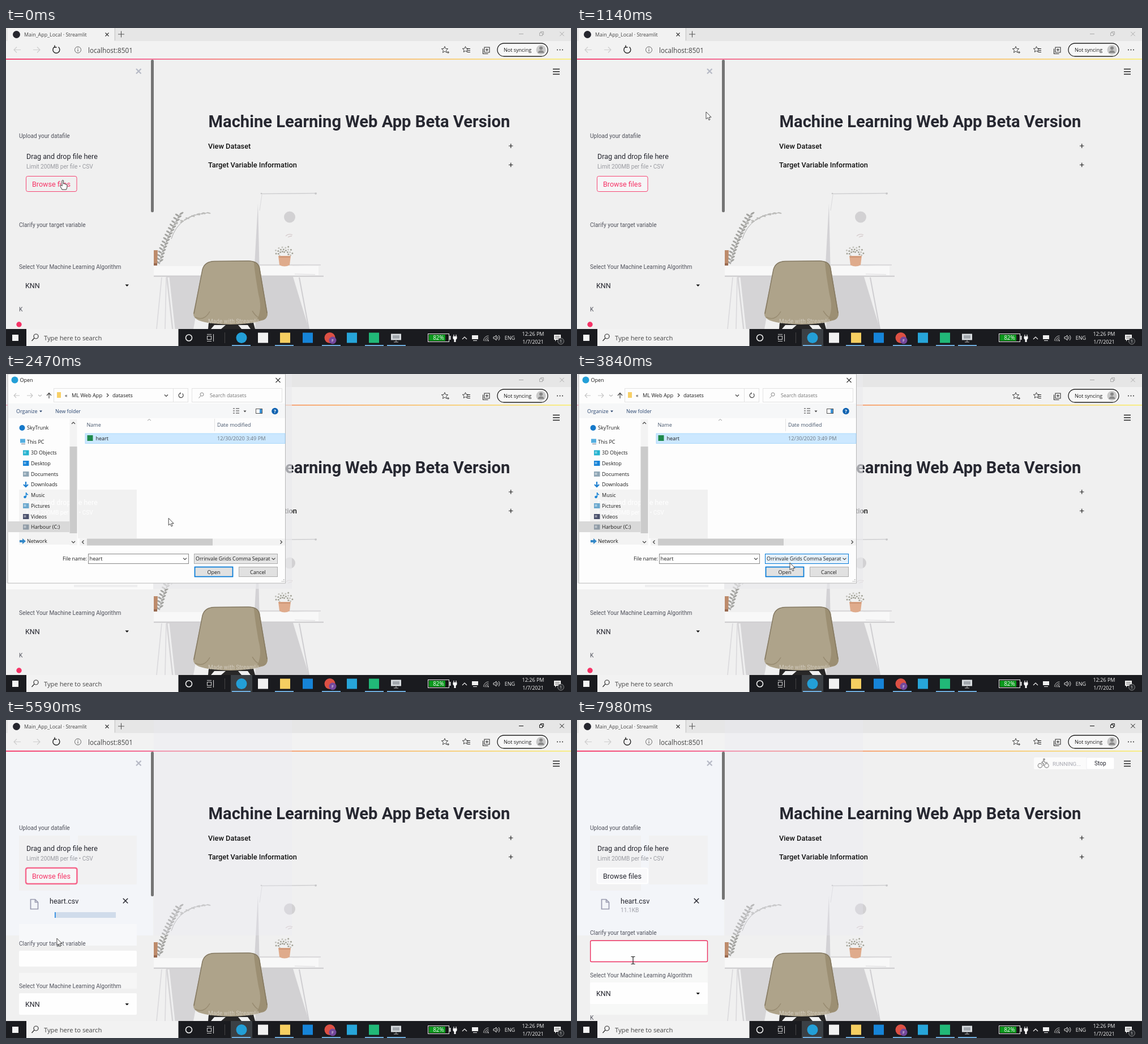
Recreate the animation shown at these times as an HTML page. Size 998 px wide and 561 px high, loop 8 s.

```html
<!DOCTYPE html>
<html lang="en">
<head>
<meta charset="utf-8">
<title>Uploading a data file</title>
<style>
html, body { margin: 0; width: 100%; height: 100%; overflow: hidden; background: #f0f0f0; }
svg { display: block; width: 998px; height: 561px; }
text { font-family: "Open Sans", "Noto Sans", sans-serif; fill: #1c1c1c; white-space: pre; }
text.w { font-family: Roboto, "Open Sans", sans-serif; fill: #262730; }
</style>
</head>
<body>
<svg id="stage" viewBox="0 0 998 561" xmlns="http://www.w3.org/2000/svg"></svg>
<script>
const LOOP = 8000;

// Markup helpers; text is placed by the middle of its capitals.
const attrs = o => Object.entries(o).map(([k, v]) => ` ${k}="${v}"`).join('');
const rect = (x, y, w, h, fill, o = {}) => `<rect${attrs({ x, y, width: w, height: h, fill, ...o })}/>`;
const disc = (cx, cy, r, fill, o = {}) => `<circle${attrs({ cx, cy, r, fill, ...o })}/>`;
const shape = (d, fill, o = {}) => `<path${attrs({ d, fill, ...o })}/>`;
const line = (d, stroke = '#222', width = 1, o = {}) => shape(d, 'none', { stroke, 'stroke-width': width, ...o });
const text = (x, y, size, s, o = {}) =>
  `<text${attrs({ x, y: (y + size * 0.36).toFixed(2), 'font-size': size, ...o })}>${s}</text>`;
const web = (x, y, size, s, o = {}) => text(x, y, size, s, { class: 'w', ...o });
const ui = (x, y, s, o = {}) => text(x, y, 9, s, o);
const group = (id, ...parts) => `<g id="${id}">${parts.join('')}</g>`;
const label = (y, s) => web(23, y, 10.15, s, { style: 'fill:#50525c' });
const grey = c => ({ style: `fill:${c}` });
const chevron = (x, y, dx, dy, c = '#444', w = 1.2) =>
  line(dx ? `M${x - dx} ${y - 3}L${x + dx} ${y}L${x - dx} ${y + 3}` : `M${x - 3} ${y - dy}L${x} ${y + dy}L${x + 3} ${y - dy}`, c, w);
const cross = (x, y, r, c, w) => line(`M${x - r} ${y - r}l${2 * r} ${2 * r}M${x + r} ${y - r}l${-2 * r} ${2 * r}`, c, w);
const star = (x, y, r) => {
  const p = Array.from({ length: 10 }, (_, i) => {
    const a = i * Math.PI / 5 - Math.PI / 2, q = i % 2 ? r * 0.45 : r;
    return `${(x + q * Math.cos(a)).toFixed(1)} ${(y + q * Math.sin(a)).toFixed(1)}`;
  });
  return line(`M${p.join('L')}Z`, '#333', 0.9);
};

function browser() {
  return [
    rect(0, 0, 998, 561, '#f0f0f0'), rect(0, 0, 998, 23, '#e6e6e6'), rect(3, 0, 188, 24, '#f2f2f2'),
    rect(0, 23, 998, 31, '#f2f2f2'), rect(192, 0, 1, 22, '#c9c9c9'),
    disc(18.5, 11.5, 6.5, '#25262e'), text(32, 11.5, 8.9, 'Main_App_Local · Streamlit', grey('#444')),
    cross(178.5, 11.5, 3, '#333', 1.1), line('M198 11h11M203.500 5.500v11', '#555', 1.1),
    line('M26 38.500H14M19 33.500l-5 5 5 5M48 38.500h12M55 33.500l5 5-5 5', '#cdcdcd', 1.1),
    line('M92.500 33.500a6 6 0 1 1-6.500-.5M86 30.500v3.500h3.500', '#222', 1.4),
    disc(127, 38.5, 5.5, 'none', { stroke: '#666' }), line('M127 37.500v4M127 35v1.300', '#666', 1.1),
    text(145, 39.3, 11.7, 'localhost:8501', grey('#444')),
    star(775, 38.5, 6), line('M779 43h4M781 41v4', '#333', 0.9),
    star(811.5, 38, 5.5), line('M814 36.500h6M815 39.500h5M815 42.500h5', '#222', 1.1),
    line('M845 34h9v9h-9zM842.500 36.500v9h9M849.500 36v5M847 38.500h5', '#333', 1.1),
    rect(868, 27, 89, 23, '#f7f7f7', { rx: 11.5, stroke: '#222', 'stroke-width': 1.3 }),
    text(879, 38.5, 9, 'Not syncing'), disc(945, 38.5, 8.5, '#c9c9c9'), disc(945, 35.5, 3, '#888'),
    shape('M939.500 44a5.500 4.500 0 0 1 11 0z', '#888'),
    [974, 978.5, 983].map(x => disc(x, 38.5, 1, '#333')).join(''),
    rect(0, 54, 998, 1.8, 'url(#bar)'),
    group('controls', line('M906 10.500h8', 'currentColor'), line('M942.500 8.500h5v5h-5zM944.500 8v-1.500h5v5h-1.500', 'currentColor'),
      cross(982, 10.5, 3.7, 'currentColor', 1))
  ].join('');
}

function deskScene() {
  let leaves = '';
  for (let i = 0; i < 30; i++) {
    const u = i / 29, x = 271 + 36 * u ** 1.4, y = 415 - 86 * u, s = i % 2 ? 1 : -1;
    leaves += `<ellipse cx="${x + s * 3.5}" cy="${y}" rx="4" ry="1.5" fill="#a4a4a1" transform="rotate(${-s * 32} ${x} ${y})"/>`;
  }
  for (let i = 0; i < 13; i++) {
    leaves += `<ellipse cx="${303 + i * 4.4}" cy="${345 - 19 * Math.sin(i / 7.8)}" rx="3.500" ry="1.200" fill="#bcbcba" transform="rotate(${i % 2 ? -25 : 15} ${303 + i * 4.4} 335)"/>`;
  }
  for (let i = 0; i < 22; i++) {
    const a = Math.PI * (1.08 + i / 21 * 0.84), r = 8 + (i * 7) % 11;
    leaves += disc(491 + r * Math.cos(a), 404 + r * 1.1 * Math.sin(a), 1.5, i % 3 ? '#a3a398' : '#c4c3bd');
  }
  return [
    line('M451 292.500L549 291.500', '#cfcfd1', 1.5), disc(451, 292, 1.3, '#c4c4c6'), disc(547, 292, 1.8, '#c4c4c6'),
    shape('M445 310L447.500 418H439Z', '#d3d2d5'), line('M452 294L448 322', '#dadadc'),
    line('M447 418H556', '#d2d1d3', 1.5), disc(501, 333.5, 10, '#d2d1d3'),
    line('M494 367q5-5 12-2M498 369q4-2 7-2', '#d6cccd', 1.3),
    rect(261, 420, 291, 16, '#f8f8f8'), line('M261 437.800H561', '#d0cfd1', 2.2), line('M506 419l50-1M510 434l36 1', '#dddcde'),
    shape('M283 439H348L331 531H293Z', '#d5d4d6'), line('M287 440L297 531', '#efeff0', 3),
    line('M275 440L266 531M283 440L281 531', '#dad9dc', 1.6),
    shape('M446 439H507L535 531H440Z', '#d2d1d3'), line('M518 440L535 531', '#cfced1', 2),
    line('M271 417Q286 360 309 326M292 372Q305 330 357 326', '#aaa', 1), leaves,
    shape('M261 392h7l-1 27h-6z', '#bd8b6b'), rect(261, 415, 6, 4, '#98694f'),
    shape('M481 402h22l-2 16q-9 5-18 0z', '#dfab8c'), line('M482 404h20', '#c98f6f', 1.5),
    shape('M358 520h79l3 11h-8l-5-7h-17l6 7h-36l8-7h-20l-6 7h-5z', '#282727'),
    shape('M347 425Q351 411 368 411L428 410.500Q444 410 448 421L462 503Q462 512 455 515 430 523 397 523 350 522 337 514 330 510 331 502Z', '#aea38a'),
    shape('M448 421L462 503Q462 512 455 515L441 518Q454 500 446 470 439 430 438 413Z', '#9c8f73'),
    line('M332 504L347 426Q351 412 368 411.500L428 411Q443 411 447 421L461 503', '#857a64', 1.4),
    line('M334 510Q350 518 360 500M458 511Q446 517 435 499', '#998c72', 1.5),
    web(357, 517.5, 10.1, 'Made with Streamlit', grey('#d1cabd'))
  ].join('');
}

function page() {
  const input = (y, h, o) => rect(23, y, 208, h, '#fefefe', { rx: 2, ...o });
  return [
    group('tint', rect(0, 56, 260, 324, '#f3f5f9'), rect(261, 0, 244, 380, '#e8e9f0', { opacity: 0.3 }),
      rect(23, 204, 90, 97, '#f1f1f2'), rect(127, 204, 104, 86, '#f1f1f2')),
    line('M230 72l8.500 8.500M238.500 72l-8.500 8.500', '#b7bac6', 2.3),
    `<rect id="thumb" x="256" y="56" width="5" height="269" rx="2" fill="#747474"/>`,
    label(190, 'Upload your datafile'), web(36, 226, 12.55, 'Drag and drop file here'),
    web(36, 244, 10.15, 'Limit 200MB per file • CSV', grey('#999aa0')),
    rect(35.5, 261.5, 89.5, 27, '#f8f6f8', { id: 'btn', rx: 3 }), web(46, 275, 12.55, 'Browse files', { id: 'btnText' }),
    rect(35, 261, 90.5, 28, 'none', { id: 'halo', rx: 3, stroke: '#f5688d', 'stroke-width': 2.4 }),
    group('file', line('M43.500 316.500h8l5 5v12h-13zM51.500 316.500v5h5', '#9a9cb0', 1.7),
      web(77, 319, 12.5, 'heart.csv'), cross(211, 319, 4.2, '#262730', 1.5)),
    group('uploading', rect(86, 339, 108, 10, '#d0dceb'), rect(86, 339, 1.6, 10, '#1c83e1'),
      rect(23, 360, 208, 38, '#f7f8fa'), rect(23, 446, 208, 28, '#f6f6f6'), input(407, 28), input(482, 38)),
    group('uploaded', web(77, 335, 10.15, '11.1KB', grey('#a0a1a8')), rect(23, 427, 208, 93, '#f7f8f7'),
      rect(23.7, 389.2, 206.8, 37.3, '#fefefe', { id: 'field', rx: 2 }), input(463, 38), rect(35.5, 399, 1.2, 17, '#222', { id: 'caret' })),
    group('form', label(347, 'Clarify your target variable'), label(421.5, 'Select Your Machine Learning Algorithm'),
      web(34, 454, 12.55, 'KNN'), shape('M210.500 452.500h6.500l-3.250 3.500z', '#111'), label(496.5, 'K'), disc(23, 523, 4.7, '#f63366')),
    line('M966 72.500h12M966 77h12M966 81.500h12', '#222', 1.5),
    web(357.5, 164.5, 29.15, 'Machine Learning Web App Beta Version', { 'font-weight': 700 }),
    ...[[208, 'View Dataset'], [241.5, 'Target Variable Information']].map(([y, s]) =>
      web(357, y, 12.8, s, { 'font-weight': 500, style: 'fill:#111' }) + line(`M888 ${y}h7.500M891.750 ${y - 3.75}v7.500`, '#222', 1.2)),
    group('status', rect(807, 66, 142, 21, '#fbfbfb', { rx: 2 }), rect(900, 66, 49, 21, '#fff', { rx: 2, stroke: '#e9e9ec', 'stroke-width': 0.7 }),
      web(840, 77.5, 9.7, 'RUNNING...', grey('#a8a9b2')), web(914, 76.5, 10.1, 'Stop'),
      group('runner', disc(827, 69.5, 2, '#999'), line('M825 73l-3 5 4 2-1 5M822 78l-3 4h-4M818 75l4-3 6 4', '#999', 1.8)),
      group('rider', disc(818, 80.5, 3.7, 'none', { stroke: '#999', 'stroke-width': 1.4 }), disc(829.5, 80.5, 3.7, 'none', { stroke: '#999', 'stroke-width': 1.4 }),
        disc(825, 69.5, 2, '#999'), line('M824 81v-4l-3-2 3-3 3 3h4', '#999', 1.7)))
  ].join('');
}

function taskbar() {
  const app = (x, c) => rect(x - 9, 537.5, 18, 18, c);
  const centre = { 'text-anchor': 'middle', style: 'fill:#f2f2f2' };
  return [
    rect(0, 531, 998, 30, '#1a1b1f'), rect(11, 541, 11, 11, '#f4f4f4'), rect(36, 531, 268.5, 30, '#f2f2f2'),
    disc(53, 544, 4, 'none', { stroke: '#333', 'stroke-width': 1.2 }), line('M50 547l-4.500 5', '#333', 1.3),
    text(67, 547, 11.2, 'Type here to search', grey('#444')),
    disc(323, 546.5, 5.5, 'none', { stroke: '#eee', 'stroke-width': 1.6 }),
    line('M355.500 543.500h7v6h-7zM355 540.500h8M355 552.500h8M366.500 540v13', '#ccc', 1.1), rect(386, 537, 1, 19, '#444'),
    rect(397, 531, 38, 30, '#3b4045', { id: 'active' }),
    disc(416, 546.5, 9.5, '#239fd7'), app(454, '#f1f1f1'), app(493, '#f6cf61'), app(533, '#1684d8'),
    disc(572, 546.5, 9.5, '#dc5044'), disc(577, 551, 6.5, '#73479c'), text(577, 551, 7.5, 'F', centre),
    app(611, '#27a5d9'), app(650, '#21b978'), rect(680, 539.5, 18, 11, '#d9dde0'), rect(683, 542, 12, 6, '#a3a8ad'), line('M689 551v3M685 554h8', '#bbb'),
    ...[399, 475, 558, 634, 673].map(x => rect(x, 559.2, 33, 1.8, '#76b9ed')),
    rect(745.5, 539.5, 37, 14, '#161616', { stroke: '#eee' }), rect(747, 541, 29, 11, '#0b991d'), rect(783.5, 543, 2, 7, '#eee'),
    text(764, 546.5, 10, '82%', centre), line('M791 541v4M795 541v4', '#fff', 1.2), shape('M789.500 544h7v4l-2 2v4h-3v-4l-2-2z', '#fff'),
    line('M806 549l4-4 4 4', '#eee', 1.2), rect(823, 542, 11, 7, '#eee'), line('M825 551.500h7', '#eee'),
    line('M843.500 552a9 9 0 0 1 9-9M846 552.500a6.500 6.500 0 0 1 6.500-6.500M848.500 552.500a4 4 0 0 1 4-4', '#bbb'), disc(851.7, 551.5, 1, '#fff'),
    line('M861 545h2l3-3v9l-3-3h-2zM868 544q2 2.500 0 5M870 542q4 4.500 0 9', '#ddd'),
    ui(890, 546.5, 'ENG', centre), ui(931, 539.5, '12:26 PM', centre), ui(931, 554, '1/7/2021', centre),
    shape('M968 541h12v9h-8l-2 3v-3h-2z', '#f3f3f3'), line('M970 544h8M970 547h8', '#555'),
    disc(980, 552.5, 5.5, '#2b2d31', { stroke: '#aaa', 'stroke-width': 0.7 }), text(980, 552.5, 7.5, '1', centre)
  ].join('');
}

function dialog() {
  const folders = [
    [139, '3D Objects', '#24b2cf'], [157.5, 'Desktop', '#1783d8'], [176.500, 'Documents', '#8fa6b5'], [195, 'Downloads', 0],
    [214, 'Music', 1], [232.5, 'Pictures', '#6ba8ce'], [251.5, 'Videos', '#49506b'], [270, 'Harbour (C:)', '#8f9ba6']
  ];
  const icon = (y, c) => c === 0 ? line(`M35 ${y - 5}v9M31 ${y}l4 4 4-4`, '#1e7fd0', 2.2)
    : c === 1 ? disc(33.5, y + 3, 2.3, '#1e86d6') + line(`M35.500 ${y + 3}v-8q0 3 3.500 4`, '#1e86d6', 1.5)
    : rect(30, y - 4.5, 10.5, 9, c) + rect(31.5, y - 2.5, 4, 4, '#fff', { opacity: 0.4 });
  const box = (x, y, w, h, fill, stroke, o) => rect(x + 0.5, y + 0.5, w - 1, h - 1, fill, { stroke, ...o });
  return [
    rect(0, 0, 505, 379, '#ececee', { opacity: 0.65 }), rect(0, 369, 260, 11, '#fafafa'), rect(120, 372, 112, 4, '#eeeeef'),
    rect(3, 0, 490.5, 369, '#fdfdfd', { stroke: '#a9a9a9', 'stroke-width': 0.8 }),
    disc(15.5, 10.5, 6, '#239fd7'), ui(24.5, 11, 'Open'), cross(480.5, 11, 4, '#333', 1.1),
    line('M24 38H14M18 34l-4 4 4 4M37 38h10M43 34l4 4-4 4', '#c6c6c6', 1.1), chevron(60, 38, 0, 1.3, '#bbb'),
    line('M76 43v-9M72 38l4-4.500 4 4.500', '#444', 1.2),
    box(84, 25, 238, 25, '#fdfdfd', '#e3e3e3'), rect(90, 32, 7, 10, '#f7cf66'), ui(104, 37.5, '«'),
    text(116, 37.5, 9.2, 'ML Web App'), chevron(179.5, 37.5, 1.5, 0), text(188, 37.5, 9.1, 'datasets'),
    chevron(283, 38, 0, 1.5), rect(295, 26, 1, 23, '#e3e3e3'), line('M311.500 34.500a4 4 0 1 1-4-.5M308 32.500v3', '#444', 1.2),
    box(328, 25, 160, 25, '#fdfdfd', '#e3e3e3'), disc(346, 36, 3, 'none', { stroke: '#888' }), line('M344 38.500l-3.500 4', '#888'),
    text(360, 38, 8.8, 'Search datasets', grey('#777')),
    rect(4, 52, 489, 26, '#f6f7f8'), ui(18, 66, 'Organize', grey('#27436e')), shape('M59 64.500h5l-2.500 3z', '#27436e'),
    text(87, 66, 8.8, 'New folder', grey('#27436e')), line('M401 61h3M401 65h3M401 69h3M406 61h6M406 65h6M406 69h6', '#777', 1.5),
    shape('M419.500 64.500h5l-2.500 3z', '#444'), box(441, 61, 12, 9, '#fff', '#555'), rect(448, 62, 4, 7, '#3b93d8'),
    disc(475, 65.5, 5.8, '#0f62b0'), text(475, 65.5, 8.5, '?', { 'text-anchor': 'middle', 'font-weight': 700, style: 'fill:#fff' }),
    rect(23, 204, 90, 97, '#f3f3f3'), rect(127, 204, 104, 86, '#f1f1f1'),
    web(36, 226, 12.55, 'Drag and drop file here', grey('#fff')), web(36, 244, 10.15, 'Limit 200MB per file • CSV', grey('#fff')),
    rect(4, 260, 108, 19, '#d9d9d9'),
    disc(28.5, 95, 5, '#1679ca'), ui(37, 95, 'SkyTrunk'),
    rect(25, 114.5, 9, 7, '#55aee0'), line('M27 123.500h7', '#778'), ui(37, 119.5, 'This PC'),
    ...folders.map(([y, s, c]) => icon(y, c) + ui(44, y, s)),
    shape('M24 293h5v-3l6 5-6 5v-3h-5z', '#3488c8'), ui(37, 295, 'Network'),
    rect(112.5, 80, 13, 222, '#f3f3f3'), rect(112.5, 128, 13, 153, '#cbcbcb'), chevron(119, 86.5, 0, -1.5), chevron(119, 296.5, 0, 1.5),
    ui(142.5, 90, 'Name', grey('#44546a')), ui(373, 90, 'Date modified', grey('#44546a')), rect(368, 79, 1, 22, '#e2e2e2'), chevron(253, 81, 0, -1.3, '#999', 1),
    `<rect id="row" x="140" y="105" width="353" height="17.500" stroke="#9fd3fb" stroke-width=".8"/>`,
    rect(143.5, 108, 10, 10, '#1f8a4c'), ui(158.5, 113.5, 'heart'), text(373, 113.5, 9.2, '12/30/2020 3:49 PM', grey('#6d7780')),
    rect(130, 290.5, 363, 12, '#f2f2f2'), rect(143, 290.5, 222, 12, '#cbcbcb'), chevron(136, 296.5, -1.5, 0), chevron(486, 296.5, 1.5, 0),
    ui(100, 326, 'File name:'), box(145, 317, 178, 18, '#fff', '#888'), text(147.5, 326, 9.2, 'heart', { id: 'name' }), chevron(316, 326, 0, 1.4),
    box(332, 317, 148, 18, '#e5e5e5', '#adadad', { id: 'filter' }), text(335, 326, 8.9, 'Orrinvale Grids Comma Separat'), chevron(472.5, 326, 0, 1.4),
    box(333, 340, 68, 18, '#e1e1e1', '#0078d7', { id: 'open', 'stroke-width': 1.7 }), ui(367, 349.5, 'Open', { 'text-anchor': 'middle' }),
    box(411, 340, 69, 18, '#e1e1e1', '#adadad'), ui(445, 349.5, 'Cancel', { 'text-anchor': 'middle' }),
    [[491, 366], [488, 366], [491, 363]].map(([x, y]) => rect(x - 1, y - 1, 1.5, 1.5, '#aaa')).join('')
  ].join('');
}

const pointers = group('pointer',
  group('arrow', shape('M0 0V12.500L3 10 5 14.500 7 13.500 5.100 9.300H9Z', '#fff', { stroke: '#333', 'stroke-width': 0.9 })),
  group('hand', shape('M0 1q0-1.500 1.300-1.500T2.600 1v5q2.500-1 3.500.8 2.500-.7 2.800 1.700v3.500L7.500 16H0L-3.500 9.500q0-2 2-1L0 10z', '#fff', { stroke: '#222', 'stroke-width': 0.9 })),
  group('beam', line('M-3.500-6.500h2.500l1 1 1-1H3.500M0-5.500V5.500M-3.500 6.500h2.500l1-1 1 1H3.500', '#222', 1.2)));

document.getElementById('stage').innerHTML =
  '<defs><linearGradient id="bar"><stop stop-color="#f63366"/><stop offset=".25" stop-color="#f4608d"/><stop offset=".53" stop-color="#f8a36a"/><stop offset="1" stop-color="#f8ee7c"/></linearGradient></defs>' +
  browser() + deskScene() + page() + taskbar() + group('dialog', dialog()) + pointers;

const el = {};
document.querySelectorAll('[id]').forEach(n => el[n.id] = n);
const show = (id, on) => el[id].style.display = on ? '' : 'none';
const set = (id, o) => { for (const k in o) el[id].setAttribute(k, o[k]); };

// time, x, y of the pointer's hot spot
const route = [
  [0, 99, 269], [270, 99, 269], [550, 138, 235], [730, 175, 197], [890, 215, 162], [1040, 228, 148],
  [1360, 228, 148], [1800, 221, 113], [2170, 221, 113], [2300, 238, 170], [2470, 287, 254], [2950, 374, 425],
  [3100, 375, 425], [3840, 376, 333], [4000, 376, 342], [4750, 376, 342], [5260, 168, 354], [5590, 90, 385],
  [5720, 76, 409], [5870, 76, 410], [6180, 76, 420], [6350, 76, 420], [6560, 99, 424], [LOOP, 99, 424]
];

function place(t) {
  const i = Math.max(1, route.findIndex(p => p[0] > t));
  const [a, b] = [route[i - 1], route[i]], u = (t - a[0]) / (b[0] - a[0]);
  return [a[1] + (b[1] - a[1]) * u, a[2] + (b[2] - a[2]) * u];
}

function draw(t) {
  const between = (a, b) => t >= a && t < b;
  const [x, y] = place(t);
  const hasFile = t >= 4950, done = t >= 6350, focused = t >= 6450;
  set('pointer', { transform: `translate(${x.toFixed(2)} ${y.toFixed(2)})` });
  show('hand', t < 330);
  show('beam', t >= 5700);
  show('arrow', between(330, 5700));

  el.controls.style.color = t < 4750 ? '#aaa' : '#111';
  show('active', t >= 70);
  show('dialog', between(1210, 4490));
  show('tint', t >= 4490);
  set('row', { fill: t < 2170 ? '#e5f3ff' : '#cce8ff' });
  show('name', t >= 2170);
  const overFilter = between(3100, 4490) && y >= 317 && y < 335;
  const overOpen = between(3100, 4490) && y >= 340 && y < 358;
  set('filter', { fill: overFilter ? '#e5f1fb' : '#e5e5e5', stroke: overFilter ? '#0078d7' : '#adadad' });
  set('open', { fill: t >= 4350 ? '#cce4f7' : overOpen ? '#e5f1fb' : '#e1e1e1' });

  show('file', hasFile);
  show('uploading', hasFile && !done);
  show('uploaded', done);
  set('form', { transform: `translate(0 ${done ? 28.5 : hasFile ? 47.5 : 0})` });
  set('thumb', { height: done ? 261 : hasFile ? 255 : 269 });
  show('halo', between(4750, 6450));
  set('btn', {
    fill: focused ? '#f9f9fb' : t < 70 ? '#f0f0f0' : '#f6f6f7',
    stroke: focused ? '#fff' : '#f63366',
    'stroke-width': focused ? 2 : 0.9
  });
  el.btnText.style.fill = focused ? '#262730' : '#f63366';
  set('field', { stroke: focused ? '#ec2f60' : 'none', 'stroke-width': 1.4 });
  show('caret', between(6450, 6970) || between(7500, 7980));

  show('status', t >= 7440);
  set('status', { opacity: Math.min(1, Math.max(0.25, (t - 7440) / 250)) });
  show('runner', t < 7830);
  show('rider', t >= 7830);
}

const start = performance.now();
function tick() {
  draw((performance.now() - start) % LOOP);
  requestAnimationFrame(tick);
}
tick();
</script>
</body>
</html>
```
